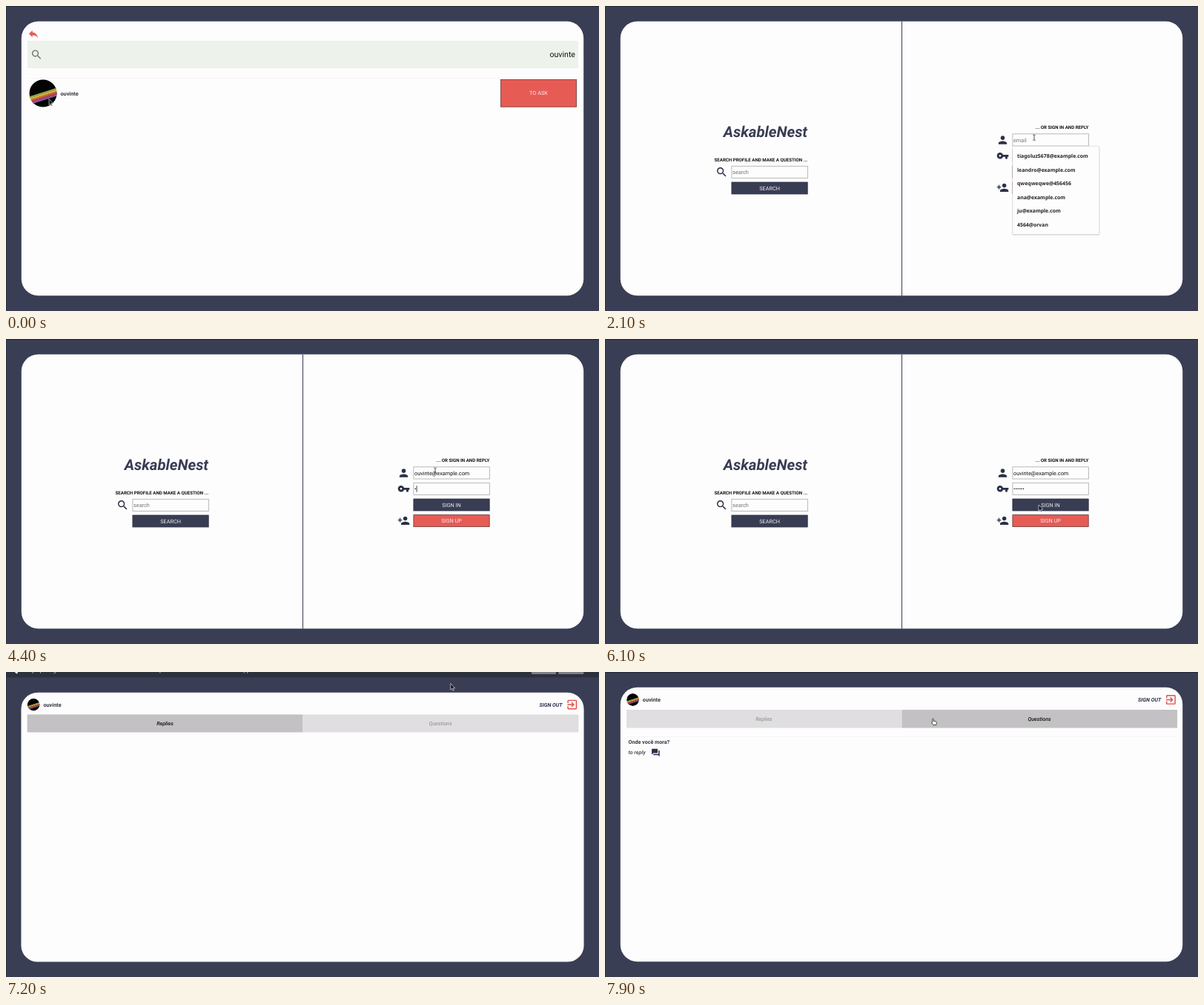
An HTML page for the animation above (8 s loop, 800 px wide and 412 px high).

```html
<!DOCTYPE html>
<html lang="pt">
<head>
<meta charset="utf-8">
<title>AskableNest</title>
<style>
html, body { margin: 0; width: 100%; height: 100%; overflow: hidden; background: #393e54; }
svg { display: block; width: 800px; height: 412px; }
text { font-family: Roboto, sans-serif; text-rendering: geometricPrecision; white-space: pre; }
.ui { font-family: "Noto Sans", "Open Sans", sans-serif; }
.b { font-weight: 700; }
.i { font-style: italic; }
.m { font-weight: 500; }
.s { font-weight: 600; }
</style>
</head>
<body>
<svg id="stage" viewBox="0 0 800 412"></svg>
<script>
const LOOP = 8000, STEP = 100, BAR = 19.5;
const NAVY = '#383d53', RED = '#e65c55', INK = '#2b3047', GREY = '#757575';
const USER = 'ouvinte', MAIL = 'ouvinte@example.com';

const ICON = {
  reply: 'M10 9V5l-7 7 7 7v-4.1c5 0 8.5 1.6 11 5.1-1-5-4-10-11-11z',
  search: 'M15.5 14h-.79l-.28-.27C15.41 12.59 16 11.11 16 9.5 16 5.91 13.09 3 9.5 3S3 5.91 3 9.5 5.91 16 9.5 16c1.61 0 3.09-.59 4.23-1.57l.27.28v.79l5 4.99L20.49 19l-4.99-5zm-6 0C7.01 14 5 11.99 5 9.5S7.01 5 9.5 5 14 7.01 14 9.5 11.99 14 9.5 14z',
  person: 'M12 12c2.21 0 4-1.79 4-4s-1.79-4-4-4-4 1.79-4 4 1.79 4 4 4zm0 2c-2.67 0-8 1.34-8 4v2h16v-2c0-2.66-5.33-4-8-4z',
  key: 'M12.65 10C11.83 7.67 9.61 6 7 6c-3.31 0-6 2.69-6 6s2.69 6 6 6c2.61 0 4.83-1.67 5.65-4H17v4h4v-4h2v-4H12.65zM7 14c-1.1 0-2-.9-2-2s.9-2 2-2 2 .9 2 2-.9 2-2 2z',
  add: 'M15 12c2.21 0 4-1.79 4-4s-1.79-4-4-4-4 1.79-4 4 1.79 4 4 4zm-9-2V7H4v3H1v2h3v3h2v-3h3v-2H6zm9 4c-2.67 0-8 1.34-8 4v2h16v-2c0-2.66-5.33-4-8-4z',
  exit: 'M10.09 15.59L11.5 17l5-5-5-5-1.41 1.41L12.67 11H3v2h9.67l-2.58 2.59zM19 3H5c-1.11 0-2 .9-2 2v4h2V5h14v14H5v-4H3v4c0 1.1.89 2 2 2h14c1.1 0 2-.9 2-2V5c0-1.1-.9-2-2-2z',
  forum: 'M21 6h-2v9H6v2c0 .55.45 1 1 1h11l4 4V7c0-.55-.45-1-1-1zm-4 6V3c0-.55-.45-1-1-1H3c-.55 0-1 .45-1 1v14l4-4h10c.55 0 1-.45 1-1z'
};

const stage = document.getElementById('stage');

function el(parent, tag, attrs = {}) {
  const node = document.createElementNS('http://www.w3.org/2000/svg', tag);
  for (const k in attrs) node.setAttribute(k, attrs[k]);
  return parent.appendChild(node);
}
const group = (parent = stage) => el(parent, 'g');
const box = (p, x, y, width, height, fill, more) => el(p, 'rect', { x, y, width, height, fill, ...more });
const icon = (p, name, x, y, k, fill) =>
  el(p, 'path', { d: ICON[name], fill, transform: `translate(${x} ${y}) scale(${k})` });

function label(p, x, y, str, size, fill, cls = '', anchor = 'start') {
  const t = el(p, 'text', { x, y, 'font-size': size, fill, class: cls, 'text-anchor': anchor });
  t.textContent = str;
  return t;
}
function button(p, x, y, w, h, str, fill, edge) {
  box(p, x, y, w, h, fill, { stroke: edge, 'stroke-width': .8 });
  label(p, x + w / 2, y + h / 2 + 2.6, str, 7.3, '#f3eef1', '', 'middle');
}
const field = (p, x, y) => box(p, x, y, 102.5, 16.2, '#fefdfe', { stroke: '#aaa', 'stroke-width': .8 });

function avatar(p, cx, cy, r) {
  const g = el(p, 'g', { transform: `translate(${cx} ${cy}) scale(${r / 18.7})`, 'clip-path': 'url(#round)' });
  el(g, 'circle', { r: 18.7, fill: '#030303' });
  const bands = el(g, 'g', { transform: 'rotate(-18)' });
  ['#8fb04c', '#e6bd45', '#dd743d', '#c9405a', '#8a5fae'].forEach((c, i) =>
    box(bands, -20, -1.5 + i * 2.1, 40, 2.1, c));
}

const clip = el(el(stage, 'defs'), 'clipPath', { id: 'round' });
el(clip, 'circle', { r: 18.7 });

box(stage, 0, 0, 800, 412, '#393e54');
box(stage, 0, 0, 800, 1, '#242838');
box(stage, 0, 0, 1, 412, '#2b3042');
const card = box(stage, 0, 0, 0, 0, '#fefdfe');

// Search results page
const results = group();
icon(results, 'reply', 29, 29.5, .67, RED);
box(results, 29, 47, 743, 37, '#edf3eb');
icon(results, 'search', 32.8, 57.3, .71, GREY);
label(results, 768, 69.2, USER, 10.6, '#111', '', 'end');
box(results, 29, 97, 743, .8, '#f5f4f5');
avatar(results, 50, 118, 18.7);
label(results, 73.5, 120.5, USER, 7.25, '#33353d', 'b');
button(results, 667.4, 99.4, 102.2, 36.8, 'TO ASK', RED, '#6b3535');

// Home page
const home = group();
box(home, 400, 21, 1, 370.5, NAVY);
label(home, 273, 177, 'AskableNest', 20.4, NAVY, 'b i', 'end');
label(home, 273, 210, 'SEARCH PROFILE AND MAKE A QUESTION ...', 6.15, '#111', 'b', 'end');
icon(home, 'search', 148.9, 215.9, .71, INK);
field(home, 170.9, 216.3);
label(home, 172, 227, 'search', 7.3, GREY);
button(home, 170.9, 238, 102.3, 16, 'SEARCH', NAVY, '#2c3044');
label(home, 652.3, 166, '... OR SIGN IN AND REPLY', 6.15, '#111', 'b', 'end');
icon(home, 'person', 528, 172.5, .71, INK);
icon(home, 'key', 528, 193.8, .71, INK);
icon(home, 'add', 528, 236.8, .71, INK);
field(home, 549.9, 172.8);
field(home, 549.9, 194.3);
button(home, 549.9, 216, 102.3, 16, 'SIGN IN', NAVY, '#2c3044');
button(home, 549.9, 237.6, 102.3, 16, 'SIGN UP', RED, '#6b3535');
const mail = label(home, 551, 183.5, '', 7.3, '#111');
const pass = label(home, 551, 204.8, '', 7.3, '#111');
const caret = box(home, 0, 0, .8, 8.4, '#111');

const menu = group(home);
box(menu, 549.4, 190, 118, 119.8, '#000', { opacity: .12, rx: 1.5 });
box(menu, 549.8, 189.4, 117, 119.2, '#fefdfe', { stroke: '#cfcfd2', 'stroke-width': .6, rx: 1 });
['tiagoluz5678@example.com', 'leandro@example.com', 'qweqweqwe@456456',
 'ana@example.com', 'ju@example.com', '4564@orvan'].forEach((s, i) =>
  label(menu, 556, 205.4 + i * 18.45, s, 6.9, '#222', 'ui s'));

// Profile page
const profile = group();
const tabs = group(profile);
const tabBox = [29, 400.5].map(x => box(tabs, x, 51, 371.5, 24.5, '#000'));
const headL = group(profile), headR = group(profile), names = group(profile);
avatar(headL, 37.5, 37.5, 8.4);
label(headL, 50.8, 40.2, USER, 7.25, '#33353d', 'b');
label(headR, 750.2, 40.2, 'SIGN OUT', 7.1, INK, 'b i', 'end');
icon(headR, 'exit', 754.9, 28.9, .71, '#dc4f47');
const tabName = [['Replies', 214.5], ['Questions', 586]].map(([s, x]) =>
  label(names, x, 65.6, s, 7.1, '#000', 'i', 'middle'));

const question = group(profile);
box(question, 29, 87, 743, .8, '#f4f3f4');
label(question, 31.5, 96.7, 'Onde você mora?', 7.15, '#33353d', 'b');
label(question, 31.5, 111.2, 'to reply', 7.1, '#55565c', 'b i');
icon(question, 'forum', 62, 102.7, .53, INK);

// Browser's password bar
const bar = group();
box(bar, 0, 0, 800, BAR, '#2d313c');
box(bar, 0, 0, 800, 1, '#20232d');
el(bar, 'path', { d: 'M9.5 8.5L14.6 13.2', stroke: '#fff', 'stroke-width': 2.4, 'stroke-linecap': 'round' });
el(bar, 'circle', { cx: 9.2, cy: 8, r: 3.3, fill: '#fff' });
el(bar, 'circle', { cx: 8.2, cy: 7, r: 1, fill: '#2d313c' });
label(bar, 19.5, 12.5, 'Deseja que o gerenciador de senhas salve a senha de "https://askablenest-frontend.herokuapp.com"?', 6.95, '#f2f2f4', 'ui');
[['Salvar', 709, 33], ['Nunca', 745.3, 34]].forEach(([s, x, w]) => {
  box(bar, x, 4.5, w, 10.6, '#7d7e88', { rx: 1 });
  label(bar, x + w / 2, 12.3, s, 7.1, '#f5f5f7', 'ui', 'middle');
});
label(bar, 789, 12.4, '×', 7.5, '#f0f0f2', 'ui', 'middle');

// Pointer shapes, hot spot at 0,0
const pointer = group();
const shape = {
  arrow: el(pointer, 'path', {
    d: 'M0 0V8.3L1.9 6.6 3.2 9.6 4.5 9 3.2 6.1H5.8Z', fill: '#111', stroke: '#fff', 'stroke-width': .6 }),
  beam: el(pointer, 'path', {
    d: 'M-1.7 -3.6H-.6L0 -3 .6 -3.6H1.7M0 -3V3M-1.7 3.6H-.6L0 3 .6 3.6H1.7', fill: 'none', stroke: '#222', 'stroke-width': .8 }),
  hand: el(pointer, 'path', {
    d: 'M-.8 .6Q0 -.6 .8 .6V3.4L3.8 4Q4.9 4.3 4.7 5.6L4.2 8.8H.3L-2.1 5.5Q-2 4.4 -.8 5.2Z',
    fill: '#fff', stroke: '#222', 'stroke-width': .8, 'stroke-linejoin': 'round' })
};

const PATH = [
  [0, 58, 125.5], [800, 37, 36], [1100, 37, 36], [1700, 579, 177.7], [5500, 579, 177.7],
  [5800, 585, 224], [6100, 585, 224], [6600, 691.5, 51.8], [6900, 762, 10], [7000, 762, 10],
  [7300, 543, 17.6], [7600, 442.6, 62.8]
];
const BAR_HEIGHT = [[6300, 0], [6500, BAR], [7000, BAR], [7300, 1.2], [7400, 0]];

const smooth = p => p * p * (3 - 2 * p);
function at(keys, t, col, ease = p => p) {
  if (t <= keys[0][0]) return keys[0][col];
  for (let i = 1; i < keys.length; i++) {
    const a = keys[i - 1], b = keys[i];
    if (t <= b[0]) return a[col] + (b[col] - a[col]) * ease((t - a[0]) / (b[0] - a[0]));
  }
  return keys[keys.length - 1][col];
}
const show = (node, on) => node.setAttribute('display', on ? 'inline' : 'none');
const typed = (t, start, pace, max) => Math.max(0, Math.min(max, Math.floor((t - start) / pace)));
function write(node, str, hint) {
  node.textContent = str || hint;
  node.setAttribute('fill', str ? '#111' : GREY);
}
const move = (node, x, y) => node.setAttribute('transform', `translate(${x} ${y})`);

function layout(h) {
  const k = (412 - h) / 412, m = 20.8 * k, d = 20.8 - m, sx = (371.5 + d) / 371.5;
  const attrs = { x: m, y: h + m, width: 800 - 2 * m, height: 412 - h - 2 * m, rx: 22.5 * k };
  for (const a in attrs) card.setAttribute(a, attrs[a]);
  const shift = y => h + y * k - y;
  tabs.setAttribute('transform', `translate(${400.5 * (1 - sx)} ${h}) scale(${sx} ${k})`);
  move(headL, -d, shift(37.5));
  move(headR, d, shift(37.5));
  move(names, 0, shift(63.2));
  move(bar, 0, h - BAR);
  show(bar, h > 0);
}

function draw(t) {
  show(results, t < 1100);
  show(home, t >= 1100 && t < 6300);
  show(profile, t >= 6300);
  layout(at(BAR_HEIGHT, t, 1));

  show(menu, t >= 1800 && t < 2500);
  write(mail, MAIL.slice(0, typed(t, 2400, 90, MAIL.length)), 'email');
  write(pass, '•'.repeat(typed(t, 4220, 180, 6)), 'password');
  const typing = t >= 2500 && t < 5700;
  show(caret, typing);
  if (typing) {
    const inMail = t < 4200, line = inMail ? mail : pass;
    const empty = !inMail && t < 4400;
    caret.setAttribute('x', 551.2 + (empty ? 0 : line.getComputedTextLength()));
    caret.setAttribute('y', inMail ? 176.8 : 198.2);
  }

  const active = t >= 7800 ? 1 : 0;
  tabBox.forEach((b, i) => b.setAttribute('fill', i === active ? '#c3c1c3' : '#e0dee0'));
  tabName.forEach((n, i) => {
    n.setAttribute('fill', i === active ? '#111' : '#88878b');
    n.setAttribute('class', i === active ? 'i m' : 'i');
  });
  show(question, active);

  const kind = (t >= 800 && t < 1100) || t >= 7600 ? 'hand' : t >= 1700 && t < 5600 ? 'beam' : 'arrow';
  for (const s in shape) show(shape[s], s === kind);
  move(pointer, at(PATH, t, 1, smooth), at(PATH, t, 2, smooth));
}

const start = performance.now();
function tick() {
  const t = (performance.now() - start) % LOOP;
  draw(Math.floor(t / STEP) * STEP);
  requestAnimationFrame(tick);
}
tick();
</script>
</body>
</html>
```
